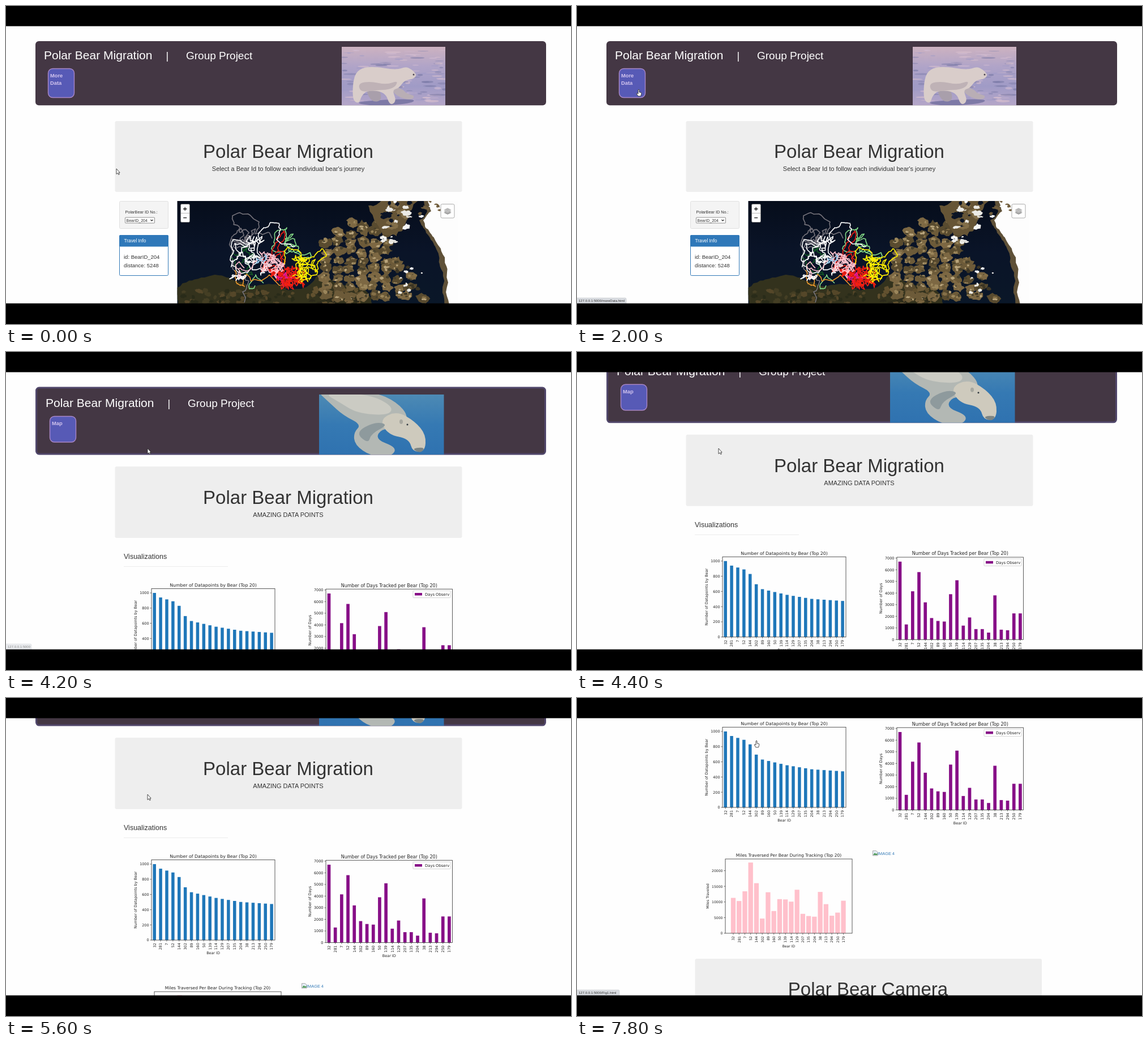
Animation of 998 by 561 pixels, one loop 8 s. Source, as an HTML page:

```html
<!DOCTYPE html>
<html lang="en">
<head>
<meta charset="utf-8">
<title>Polar Bear Migration</title>
<style>
html, body { margin: 0; width: 100%; height: 100%; overflow: hidden; background: #fefefe; }
svg { display: block; width: 100vw; height: 100vh; }
text { font-family: "Liberation Sans", Arial, sans-serif; fill: #333; white-space: pre; }
.plot text { font-family: "DejaVu Sans", sans-serif; fill: #222; }
.mid { text-anchor: middle; }
.end { text-anchor: end; }
.tracks path { fill: none; stroke-width: 1.6; stroke-linejoin: round; }
</style>
</head>
<body>
<svg id="stage" viewBox="0 0 998 561"></svg>
<script>
let seed = 77;
const rand = () => (seed = (seed * 16807) % 2147483647) / 2147483647;
const spread = r => (rand() - 0.5) * 2 * r;
const pick = list => list[Math.floor(rand() * list.length)];
const times = (n, make) => Array.from({ length: n }, (_, i) => make(i)).join('');

const rect = (x, y, w, h, fill, extra = '') =>
  `<rect x="${x}" y="${y}" width="${w}" height="${h}" fill="${fill}" ${extra}/>`;
const text = (x, y, size, str, extra = '') =>
  `<text x="${x}" y="${y}" font-size="${size}" ${extra}>${str}</text>`;
const upright = (x, y, size, str, cls) =>
  text(0, 0, size, str, `class="${cls}" transform="translate(${x} ${y}) rotate(-90)"`);
const path = (d, fill, extra = '') => `<path d="${d}" fill="${fill}" ${extra}/>`;
const fixed = p => p.map(v => v.toFixed(1)).join(' ');
const poly = (pts, closed = true) => 'M' + pts.map(fixed).join('L') + (closed ? 'Z' : '');
const pairs = str => str.split(' ').map(p => p.split(',').map(Number));

// Closed curve through the midpoints of a polygon
function soft(str) {
  const pts = pairs(str);
  const mid = (a, b) => [(a[0] + b[0]) / 2, (a[1] + b[1]) / 2];
  return 'M' + fixed(mid(pts.at(-1), pts[0])) + pts.map((p, i) =>
    'Q' + fixed(p) + ' ' + fixed(mid(p, pts[(i + 1) % pts.length]))).join('') + 'Z';
}

// Fractal subdivision for coasts and trails
function rough(pts, amp, levels = 3, closed = true) {
  for (let l = 0; l < levels; l++) {
    pts = pts.flatMap((a, i) => {
      if (!closed && i === pts.length - 1) return [a];
      const b = pts[(i + 1) % pts.length];
      const d = Math.hypot(b[0] - a[0], b[1] - a[1]) * amp;
      return [a, [(a[0] + b[0]) / 2 + spread(d), (a[1] + b[1]) / 2 + spread(d)]];
    });
  }
  return poly(pts, closed);
}

function isle(x, y, rx, ry, fill) {
  const turn = rand() * 6;
  const pts = Array.from({ length: 6 }, (_, i) => {
    const a = turn + i / 6 * Math.PI * 2, r = 0.7 + rand() * 0.6;
    return [x + Math.cos(a) * rx * r, y + Math.sin(a) * ry * r];
  });
  return path(rough(pts, 0.2, 2), fill);
}
const speckles = (n, x, y, rx, ry, size, fills) => times(n, () =>
  isle(x + spread(rx), y + spread(ry), size * (0.4 + rand()), size * (0.3 + rand() * 0.6), pick(fills)));

function archipelago() {
  let out = '';
  for (let y = 384; y < 524; y += 16) {
    const left = Math.max(566, 612 - (y - 384) * 1.5), right = 692 + Math.max(0, y - 440) * 0.7;
    for (let x = left; x < right; x += 21) {
      const cx = x + spread(4), cy = y + spread(4);
      out += isle(cx, cy, 11, 9, pick(['#6d5b39', '#7d6843', '#594b2f']))
        + speckles(4, cx, cy, 6, 5, 3.5, ['#9b865b', '#47402b', '#857048', '#b9a57c']);
    }
  }
  return out;
}

// Heading drifts at random and turns back at the rim of an ellipse
function wander(color, cx, cy, rx, ry, n) {
  let x = cx, y = cy, heading = rand() * 6;
  const pts = [];
  for (let i = 0; i < n; i++) {
    const u = (x - cx) / rx, v = (y - cy) / ry;
    heading = u * u + v * v > 1 ? Math.atan2(-v, -u) + spread(0.9) : heading + spread(1.8);
    const stride = 2 + rand() * 7;
    x += Math.cos(heading) * stride;
    y += Math.sin(heading) * stride;
    pts.push([x, y]);
  }
  return path(poly(pts, false), 'none', `stroke="${color}"`);
}
const trail = (color, str) => path(rough(pairs(str), 0.25, 3, false), 'none', `stroke="${color}"`);

const tracks = () => '<g class="tracks">'
  + trail('#77747c', '470,410 440,402 447,381 400,370 413,392 399,407 409,472 429,485 421,523')
  + wander('#77747c', 428, 420, 28, 30, 70)
  + wander('#125b25', 420, 452, 26, 26, 45)
  + trail('#84d987', '470,430 475,400 496,391 492,418 517,437 537,435 538,445 512,448')
  + wander('#84d987', 490, 430, 30, 28, 35)
  + trail('#84d987', '455,489 441,474 430,499 440,493')
  + trail('#f19a2b', '404,466 408,490 421,495 425,473 507,491')
  + trail('#f21d13', '465,448 478,410 491,397 489,415 475,436')
  + wander('#f21d13', 480, 452, 27, 26, 90)
  + wander('#f21d13', 494, 478, 43, 15, 170)
  + wander('#ffffff', 432, 442, 36, 35, 150)
  + trail('#ffffff', '399,452 399,416 446,412 455,391 471,382 485,393 478,412 511,424')
  + wander('#ffffff', 412, 471, 21, 9, 30)
  + wander('#ffc0cb', 448, 460, 42, 25, 150)
  + wander('#94c9ec', 464, 452, 18, 10, 14)
  + wander('#e4189a', 488, 484, 25, 7, 18)
  + wander('#ffee00', 523, 464, 25, 21, 140)
  + trail('#ffee00', '492,455 498,425 523,451 544,443 558,428 566,441 549,456 535,484')
  + wander('#f21d13', 502, 485, 32, 9, 45) + '</g>';

function controls() {
  const diamond = (y, fill) => path(`M780 ${y}l7 3.5-7 3.5-7-3.5z`, fill, 'stroke="#fff" stroke-width=".5"');
  return rect(308.5, 349.5, 16, 32, '#fff', 'rx="2" stroke="#777"')
    + path('M309 365.5h15', 'none', 'stroke="#bbb"')
    + path('M313 358h6.5M316.2 354.8v6.5M313.2 373.7h6', 'none', 'stroke="#111" stroke-width="1.3"')
    + rect(768, 349.5, 24, 24.5, '#fff', 'rx="2.5" stroke="#aaa"')
    + diamond(361, '#8c8c8c') + diamond(358.5, '#a5a5a5') + diamond(356, '#b9b9b9');
}

function map() {
  const mainland = pairs('302,497 345,479 398,482 470,491 522,499 548,477 592,490 640,507 648,530 302,530');
  const glacier = pairs('850,330 738,340 744,362 730,378 742,400 758,424 772,470 776,530 850,530');
  const cape = pairs('640,352 668,340 730,340 712,372 690,406 666,404');
  const snow = ['#f6f6f4', '#ecebe6'];
  return '<g clip-path="url(#mapClip)">' + rect(302, 344, 496, 182, 'url(#sea)')
    + path(rough(mainland, 0.12), '#33321d')
    + speckles(60, 405, 513, 102, 11, 6, ['#443e24', '#292b19', '#554729'])
    + speckles(40, 582, 512, 50, 14, 6, ['#62512f', '#2c2a1b', '#7a6540'])
    + archipelago()
    + path(rough(cape, 0.18), '#665536')
    + speckles(30, 688, 368, 26, 24, 7, [...snow, '#826e49', '#0b1425'])
    + speckles(12, 677, 412, 16, 6, 4, snow)
    + speckles(14, 710, 485, 26, 24, 4, [...snow, '#3c3524'])
    + path(rough(glacier, 0.1), '#5f5138')
    + path(rough(glacier, 0.1), '#fdfdfd', 'transform="translate(7)"')
    + speckles(16, 750, 360, 20, 18, 4, ['#705d3d', '#fbfbfb'])
    + '</g>' + tracks() + controls();
}

function walkingBear() {
  const ripples = times(120, i => {
    const y = 78 + rand() * 96;
    const grow = 0.5 + (y - 78) / 96;
    return `<ellipse cx="${(593 + rand() * 183).toFixed(1)}" cy="${y.toFixed(1)}" rx="${(3 + rand() * 12).toFixed(1)}" ry="${(0.5 + rand() * 1.6 * grow).toFixed(1)}" fill="${pick(['#d2bdd2', '#8482ae', '#a09bc6', '#dcc3cf', '#7776a3'])}" opacity=".6"/>`;
  });
  return '<g clip-path="url(#walkClip)">' + rect(593, 72, 183, 104, 'url(#snow)') + ripples
    + path(soft('612,170 670,165 724,164 716,172 650,177'), '#7d79a6')
    + path(soft('636,144 660,146 664,166 650,170 640,160'), '#a99fab')
    + path(soft('680,140 700,146 708,155 722,158 718,165 702,164 684,154'), '#b9aeb5')
    + path(soft('614,168 612,152 614,128 622,112 645,106 690,113 706,107 717,112 726,122 719,129 704,131 694,145 682,148 690,168 678,176 670,152 640,148 628,158 624,172'), '#d9cdca')
    + path(soft('622,136 645,133 672,139 694,131 684,147 648,149 626,152'), '#bfb2b6')
    + '<circle cx="720" cy="121" r="1.5" fill="#4d4552"/></g>';
}

const swimmingBear = () => '<g clip-path="url(#swimClip)">' + rect(553, 75, 221, 107, 'url(#water)')
  + path(soft('545,65 650,70 690,88 712,114 698,138 664,134 652,154 690,168 682,184 645,184 616,164 614,142 628,128 596,112 572,90'), '#b3b8b4')
  + path(soft('560,72 641,74 684,96 676,112 620,108 588,88'), '#cbcbc3')
  + path(soft('660,119 690,104 722,122 742,146 740,176 718,176 712,153 675,146'), '#cecabd')
  + path(soft('617,142 651,123 676,128 645,144 640,162'), '#8e9a9d')
  + path(soft('716,170 741,168 732,179'), '#7d8584')
  + '<circle cx="709" cy="128" r="1.5" fill="#30383f"/><ellipse cx="698" cy="123" rx="3" ry="4" fill="#a7a79f"/></g>';

function header(shift, button, height) {
  const words = button.map((w, i) =>
    text(78 + shift, 126 + shift + i * 13, 9.3, w, 'font-weight="bold" style="fill:#d3c5ee"')).join('');
  const white = 'style="fill:#fff"';
  return text(67 + shift, 94 + shift, 21, 'Polar Bear Migration', white)
    + text(282.5 + shift, 94 + shift, 18, '|', white)
    + text(318 + shift, 94 + shift, 19, 'Group Project', white)
    + rect(74.5 + shift, 110.5 + shift, 46, height, '#575ab6', 'rx="8" stroke="#a987c6" stroke-width="1.4"') + words;
}
const jumbotron = (y, line) => rect(192.5, y, 613, 328 - y, '#eee', 'rx="3"')
  + text(498.5, 268, 33, 'Polar Bear Migration', 'class="mid"')
  + text(498.5, 291, 11, line, 'class="mid"');

const bears = '32 281 7 52 144 302 89 160 50 139 114 129 207 135 204 38 213 294 250 179'.split(' ');

function chart(c) {
  const base = c.y + c.h, unit = c.h / c.max, at = v => base - v * unit;
  const tick = d => path(d, 'none', 'stroke="#333" stroke-width=".7"');
  let out = times(bears.length, i => {
    const x = c.first + i * c.gap, v = c.value(i);
    return rect((x - c.bar / 2).toFixed(2), at(v).toFixed(2), c.bar, (v * unit).toFixed(2), c.color)
      + tick(`M${x} ${base}v2.5`) + upright(x + 2.3, base + 5, c.size, bears[i], 'end');
  });
  for (let v = 0; v <= c.max; v += c.step)
    out += tick(`M${c.x} ${at(v)}h-2.5`) + text(c.x - 4.5, at(v) + 2.4, c.size, v, 'class="end"');
  const middle = c.x + c.w / 2;
  return '<g class="plot">' + out
    + rect(c.x, c.y, c.w, c.h, 'none', 'stroke="#333" stroke-width=".8"')
    + text(middle, c.y - 3.6, c.titleSize, c.title + ' (Top 20)', 'class="mid"')
    + text(middle, base + 25, c.size, 'Bear ID', 'class="mid"')
    + upright(c.labelX, c.y + c.h / 2, c.size + 0.2, c.label, 'mid') + '</g>';
}

const hundreds = str => i => str.split(' ')[i] * 100;
// Straight lines between a few bars of the falling curve
function between(str) {
  const keys = pairs(str);
  return i => {
    const n = keys.findIndex(k => k[0] >= i), b = keys[n], a = keys[n - 1] || b;
    return a === b ? b[1] : a[1] + (b[1] - a[1]) * (i - a[0]) / (b[0] - a[0]);
  };
}

const charts = [
  { title: 'Number of Datapoints by Bear', titleSize: 7.83, label: 'Number of Datapoints by Bear', labelX: 231,
    x: 257, y: 417.5, w: 218, h: 141.5, first: 262.2, gap: 10.89, bar: 5.5, max: 1056, step: 200, size: 6.4,
    color: '#1f77b9', value: between('0,1000 1,940 3,890 4,830 5,695 6,630 10,555 14,502 19,475') },
  { title: 'Number of Days Tracked per Bear', titleSize: 8, label: 'Number of Days', labelX: 538.5,
    x: 565, y: 418.2, w: 223.5, h: 145.3, first: 570.5, gap: 11.18, bar: 5.7, max: 7080, step: 1000, size: 6.5,
    color: '#870f87', value: hundreds('67 13 41.5 58 32 18.5 16 15.5 39 51 12 19 9 9 6 38 8.5 8 22.5 22.5') },
  { title: 'Miles Traversed Per Bear During Tracking', titleSize: 7.5, label: 'Miles Traveled', labelX: 233,
    x: 262, y: 650, w: 224, h: 131, first: 276, gap: 10.24, bar: 8.3, max: 23730, step: 5000, size: 6.1,
    color: '#ffc0cb', value: hundreds('113 103 134 226 160 47 131 71 109 108 101 139 62 55 53 132 93 56 66 104') }];

const mapPage = rect(52, 62, 902, 113.2, '#443744', 'rx="6"') + walkingBear()
  + header(0, ['More', 'Data'], 51) + jumbotron(203, 'Select a Bear Id to follow each individual bear\'s journey')
  + rect(200.5, 344.5, 86, 48, '#f4f4f4', 'rx="2" stroke="#e0e0e0"')
  + text(210.5, 366, 7.3, 'PolarBear ID No.:')
  + rect(210.5, 373, 52, 10, '#fff', 'rx="1" stroke="#777" stroke-width=".8"')
  + text(212.5, 380.6, 7, 'BearID_204') + path('M255.5 377l2 2 2-2', 'none', 'stroke="#222" stroke-width="1.1"')
  + rect(200.5, 404.5, 86, 71, '#fff', 'rx="2" stroke="#337ab7"') + rect(200, 404, 87, 20.5, '#2f78b9', 'rx="2"')
  + text(208.5, 417, 8.3, 'Travel Info', 'style="fill:#fff"')
  + text(208, 445.5, 9.5, 'id: BearID_204') + text(208, 460.5, 9.5, 'distance: 5248') + map();

const dataPage = rect(53.5, 63, 899, 117, '#443744', 'rx="5" stroke="#51476b" stroke-width="3"') + swimmingBear()
  + header(3, ['Map'], 45.5) + jumbotron(202, 'AMAZING DATA POINTS')
  + text(208, 365, 12.5, 'Visualizations') + rect(208, 378, 184, 1, '#ececec')
  + charts.map(chart).join('')
  + '<g class="plot">' + rect(719, 421, 66, 12.5, '#fff', 'rx="1" stroke="#ccc" stroke-width=".8"')
  + rect(722, 425, 13, 4.5, '#870f87') + text(740, 429.8, 6.8, 'Days Observ') + '</g>'
  + path('M522.5 635.5h6l2.5 2.5v6h-8.5z', '#e4edf5', 'stroke="#999" stroke-width=".8"')
  + path('M523 643l3-4 2 2 2.5-1v3z', '#4f9a57')
  + text(531, 642.5, 7.4, 'IMAGE 4', 'style="fill:#337ab7"')
  + rect(208.5, 826, 612.5, 120, '#eee', 'rx="3"') + text(514, 891, 33, 'Polar Bear Camera', 'class="mid"');

const gradient = (id, ...stops) => `<linearGradient id="${id}" x2="0" y2="1">` + stops.map((c, i) =>
  `<stop offset="${i / (stops.length - 1)}" stop-color="${c}"/>`).join('') + '</linearGradient>';
const clip = (id, ...box) => `<clipPath id="${id}">${rect(...box, '#000')}</clipPath>`;

document.getElementById('stage').innerHTML = '<defs>'
  + gradient('sea', '#060d1b', '#0a1428', '#0a1728') + gradient('snow', '#cdb2c0', '#b0a4c8', '#a09bc6', '#b5a6c8')
  + gradient('water', '#4d8ab4', '#3579b3', '#2f72b0')
  + clip('mapClip', 302.5, 344, 495.5, 182) + clip('walkClip', 593, 72, 183, 103) + clip('swimClip', 553, 75, 220.5, 106)
  + '</defs>' + rect(0, 0, 998, 561, '#fefefe')
  + `<g id="mapPage">${mapPage}</g><g id="dataPage">${dataPage}</g>`
  + `<g id="status">${rect(-2, 515, 91, 12, '#d9dce1', 'id="bubble" rx="2" stroke="#c4c7cc" stroke-width=".6"')}`
  + `${text(3, 522, 6, '', 'id="link"')}</g>`
  + path('M0 0V9.6L2.2 7.6 3.8 10.6 5.3 9.9 3.8 7H6.2Z', '#fff', 'id="arrow" stroke="#222" stroke-width=".8"')
  + path('M-1 1Q0-1 1 1V5L4.5 5.8Q5 6 4.6 8.4L3.6 12H-1.2L-3.6 8Q-3.8 6.4-2.4 7L-1 8Z', '#fff', 'id="hand" stroke="#222" stroke-width=".8"')
  + rect(0, 0, 998, 35.6, '#000') + rect(0, 524.6, 998, 37, '#000');

const $ = id => document.getElementById(id);
const show = (id, on) => $(id).setAttribute('display', on ? 'inline' : 'none');

const LOOP = 8000, TICK = 200, PAGE_TURN = 2800, NOTCH = 122;
function ease(t, from, to) {
  const k = Math.min(1, Math.max(0, (t - from) / (to - from)));
  return k * k * (3 - 2 * k);
}
const scrollAt = t => NOTCH * (ease(t, 4220, 4600) + ease(t, 5500, 6070) + ease(t, 6540, 7200));
function cursorAt(t) {
  const toButton = ease(t, 100, 1700), away = ease(t, 3760, 4200), overChart = ease(t, 7400, 7800);
  return [195 - 86 * toButton + 141 * away + 67 * overChart, 287 - 140 * toButton + 23 * away - 95 * overChart];
}

// Link under the cursor, in page coordinates
function hover(t) {
  const [x, top] = cursorAt(t), y = top + scrollAt(t);
  if (x > 74 && x < 124 && y > 111 && y < 162) return t < PAGE_TURN ? '/moreData.html' : ' ';
  if (t > PAGE_TURN && x > 222 && x < 490 && y > 415 && y < 600) return '/Fig1.html';
  return '';
}

const start = performance.now();
function draw() {
  const t = Math.floor((performance.now() - start) % LOOP / TICK) * TICK;
  const link = hover(t), lingering = link || hover(t - 2 * TICK);
  show('mapPage', t < PAGE_TURN);
  show('dataPage', t >= PAGE_TURN);
  $('dataPage').setAttribute('transform', `translate(0 ${-scrollAt(t)})`);
  show('hand', link);
  show('arrow', !link);
  $(link ? 'hand' : 'arrow').setAttribute('transform', `translate(${cursorAt(t)})`);
  show('status', lingering);
  $('status').setAttribute('opacity', link ? 1 : 0.55);
  $('link').textContent = '127.0.0.1:5000' + lingering.trim();
  $('bubble').setAttribute('width', 47 + lingering.trim().length * 3);
  requestAnimationFrame(draw);
}
draw();
</script>
</body>
</html>
```
